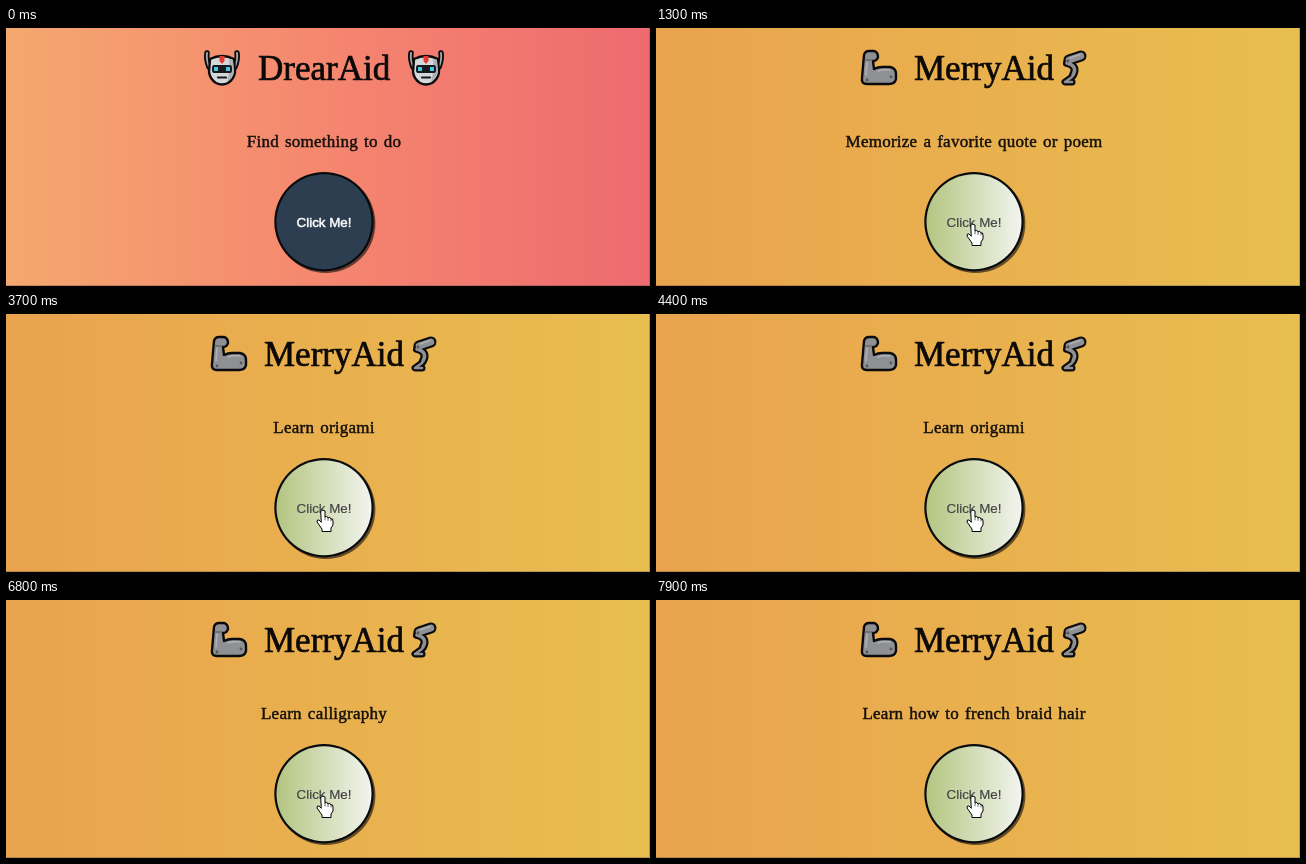
Animation, 644 px wide and 258 px high, one loop 8000 ms. Source, as an HTML page with a canvas:

```html
<!DOCTYPE html>
<html lang="en">
<head>
<meta charset="utf-8">
<title>Activity finder</title>
<style>
  html, body { margin: 0; width: 100%; height: 100%; overflow: hidden; }
  canvas { display: block; width: 644px; height: 258px; }
</style>
</head>
<body>
<canvas id="stage" width="644" height="258"></canvas>
<script>
const ctx = document.getElementById('stage').getContext('2d');
const W = 644, H = 258, LOOP = 8000, CLICK = 1300;
const SERIF = '"Liberation Serif", serif';
const INK = '#0b0b0d', STEEL = '#8f9093';
const BUTTON = { x: 318, y: 193.7, r: 49.7 };

const prompts = [
  [0, 'Find something to do'],
  [CLICK, 'Memorize a favorite quote or poem'],
  [2400, 'Learn how to write in shorthand'],
  [3700, 'Learn origami'],
  [4800, 'Learn how the internet works'],
  [6800, 'Learn calligraphy'],
  [7900, 'Learn how to french braid hair']
];

// Pointer positions, one per 100 ms, the last one held
const pointerStops = [[251, 30], [288, 112], [341, 217], [317, 196]];

const themes = {
  drear: {
    page: ['#f4a86f', '#f5866f', '#ee6a6f'],
    button: ['#2c3e4f', '#2c3e4f'],
    label: '#fff', labelWeight: 0.5, title: 'DrearAid', titleX: 252
  },
  merry: {
    page: ['#e9a34e', '#e9b04e', '#e8be50'],
    button: ['#b2c47e', '#f4f5f1'],
    label: '#444', labelWeight: 0.2, title: 'MerryAid', titleX: 258
  }
};

function across(x0, x1, colors) {
  const g = ctx.createLinearGradient(x0, 0, x1, 0);
  colors.forEach((c, i) => g.addColorStop(i / (colors.length - 1), c));
  return g;
}

function text(str, x, y, font, color, weight, align = 'center') {
  ctx.font = font;
  ctx.fillStyle = ctx.strokeStyle = color;
  ctx.textAlign = align;
  ctx.lineJoin = 'round';
  ctx.lineWidth = weight;
  ctx.fillText(str, x, y);
  ctx.strokeText(str, x, y);
}

function shape(d, fill, line, width = 2) {
  const path = new Path2D(d);
  if (fill) {
    ctx.fillStyle = fill;
    ctx.fill(path);
  }
  if (line) {
    ctx.strokeStyle = line;
    ctx.lineWidth = width;
    ctx.stroke(path);
  }
}

function at(x, y, draw) {
  ctx.save();
  ctx.translate(x, y);
  ctx.lineJoin = ctx.lineCap = 'round';
  draw();
  ctx.restore();
}

function robotHead() {
  const horns = 'M3 3Q2 9 5 17M33 3Q34 9 31 17';
  shape(horns, null, INK, 5.5);
  shape(horns, null, '#a9acb0', 1.8);
  shape('M6 9Q18 3 30 9L31 22Q30 29 24 33Q18 36 12 33Q6 29 5 22Z', '#d5d8db', INK, 2.4);
  shape('M25 9L29 10L30 22Q29 28 23 32Q26 21 25 9z', '#aeb2b6');
  shape('M15.500 6h5v5l-2.500 3l-2.500-3z', '#e8392f');
  shape('M10 15h16q2 0 2 3v2q0 3-2 3h-16q-2 0-2-3v-2q0-3 2-3z', '#17191d');
  shape('M10 17h4v4h-4zM22 17h4v4h-4z', '#42c9e6');
  shape('M14 27.500h8', null, '#17191d', 2.2);
}

function bolts(points) {
  for (const [x, y] of points) {
    ctx.fillStyle = '#55585c';
    ctx.beginPath();
    ctx.arc(x, y, 1.4, 0, Math.PI * 2);
    ctx.fill();
  }
}

function metalArm() {
  shape('M4 5Q5 1 9 1H14Q18 2 18 7Q17 11 13 11L14 19Q18 17 22 17H30Q36 18 36 24V29Q35 34 29 34H7Q1 34 2 28Z',
    STEEL, INK, 2.4);
  shape('M7 12L6 25M18 21Q23 19 30 20', null, '#aeb0b3', 1.6);
  shape('M5 10h7', null, '#55585c', 1.2);
  bolts([[7, 30], [31, 27]]);
}

function metalLeg() {
  const parts = [['M21 6L9 10', 11], ['M7 13Q18 16 13 25', 8], ['M12 27L5 32H12', 7]];
  parts.forEach(([d, width]) => shape(d, null, INK, width));
  parts.forEach(([d, width]) => shape(d, null, STEEL, width - 4.4));
  shape('M10 8L20 4.500', null, '#aeb0b3', 1.4);
  bolts([[8, 11]]);
}

function arrow() {
  shape('M0 0V16L4 12.500L7 19L10 17.500L7 11.500H12Z', '#fff', '#000', 1);
}

function hand() {
  shape('M-2 1Q0-1 2 1V7Q4 5 5 8Q7 6 8 9Q10 8 10 11V15L8 18V21.500H-1V19L-6 12Q-6 9-4 10L-2 12Z',
    '#fff', '#000', 1);
  shape('M2 7v3M5 8v2.500M8 9v2', null, '#000', 0.6);
}

function drawButton(theme) {
  const { x, y, r } = BUTTON;
  const disc = (radius, shift = 0) => {
    ctx.beginPath();
    ctx.arc(x + shift, y + shift, radius, 0, Math.PI * 2);
    ctx.fill();
  };
  ctx.fillStyle = 'rgba(30,20,15,.65)';
  disc(r, 1.7);
  ctx.fillStyle = '#080a0c';
  disc(r);
  ctx.fillStyle = across(x - r, x + r, theme.button);
  disc(r - 2.2);
  text('Click Me!', x, 199, '13.333px "Liberation Sans", sans-serif', theme.label, theme.labelWeight);
}

function drawPointer(t) {
  const step = Math.floor(t / 100) - 1;
  if (step < 0) return;
  const [x, y] = pointerStops[Math.min(step, pointerStops.length - 1)];
  const over = Math.hypot(x - BUTTON.x, y - BUTTON.y) < BUTTON.r;
  at(x, y, over ? hand : arrow);
}

function drawPrompt(t) {
  const prompt = prompts.filter(([start]) => start <= t).pop()[1];
  ctx.save();
  ctx.wordSpacing = '1.5px';
  ctx.letterSpacing = '0.25px';
  text(prompt, 318, 119, '17px ' + SERIF, '#14100c', 0.45);
  ctx.restore();
}

function render(t) {
  const merry = t >= CLICK;
  const theme = merry ? themes.merry : themes.drear;
  ctx.fillStyle = across(0, W, theme.page);
  ctx.fillRect(0, 0, W, H);
  ctx.fillStyle = 'rgba(90,80,70,.35)';
  ctx.fillRect(0, H - 1, W, 1);
  ctx.fillRect(W - 1, 0, 1, H - 1);

  text(theme.title, theme.titleX, 52, '35px ' + SERIF, '#0c0a08', 0.7, 'left');
  if (merry) {
    at(204, 22, metalArm);
    at(404, 22, metalLeg);
  } else {
    at(198, 22, robotHead);
    at(402, 22, robotHead);
  }
  drawPrompt(t);
  drawButton(theme);
  drawPointer(t);
}

const begin = performance.now();
function tick() {
  render((performance.now() - begin) % LOOP);
  requestAnimationFrame(tick);
}
tick();
</script>
</body>
</html>
```
